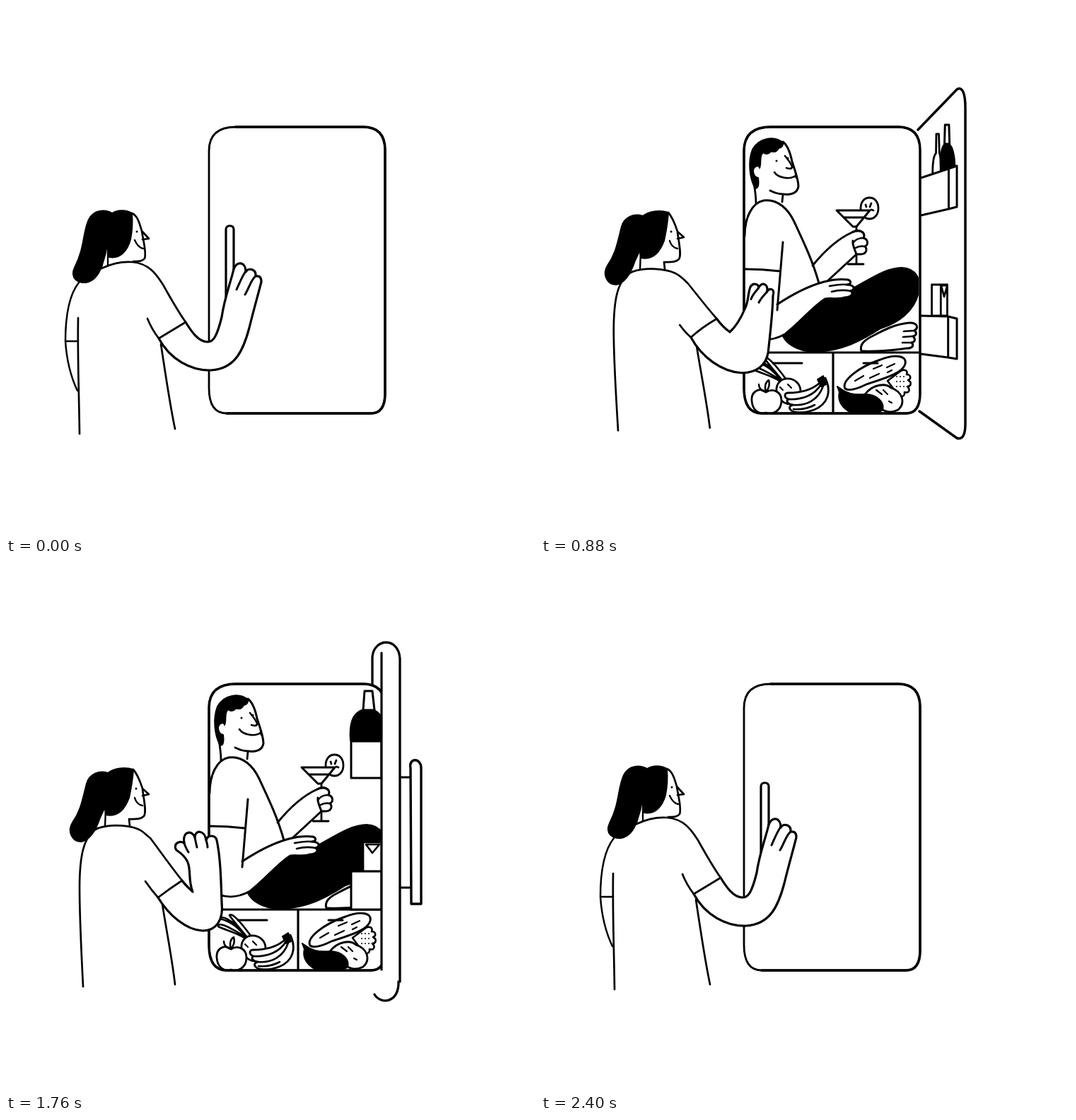
Recreate the animation shown at these times as an HTML page with a canvas. Size 748 by 748 pixels, loop 2.88 s.

```html
<!DOCTYPE html>
<html lang="en">
<head>
<meta charset="utf-8">
<title>Fridge</title>
<style>
html, body { margin: 0; width: 100%; height: 100%; overflow: hidden; background: #fff; }
canvas { display: block; width: 748px; height: 748px; }
</style>
</head>
<body>
<canvas id="stage" width="748" height="748"></canvas>
<script>
const ctx = document.getElementById('stage').getContext('2d');
const LOOP = 2880, STEP = 80, LAST = 30;
const clamp = v => Math.max(0, Math.min(1, v));

function trace(d, matrix) {
  const path = new Path2D();
  path.addPath(new Path2D(d), matrix);
  return path;
}
function ink(d, width = 3, fill = null, matrix = new DOMMatrix()) {
  const path = trace(d, matrix);
  if (fill) { ctx.fillStyle = fill; ctx.fill(path); }
  ctx.lineWidth = width;
  ctx.stroke(path);
}
const solid = (d, matrix) => ink(d, 2, '#000', matrix);
const paper = (d, width, matrix) => ink(d, width, '#fff', matrix);
function dot(x, y, r = 1.5) {
  ctx.fillStyle = '#000';
  ctx.beginPath();
  ctx.arc(x, y, r, 0, 7);
  ctx.fill();
}
// Blend two path strings that share the same commands.
function mix(a, b, t) {
  const number = /[\d.]+/g, goal = b.match(number);
  let i = 0;
  return a.replace(number, v => (+v + (goal[i++] - v) * t).toFixed(2));
}

// ---- Woman ----
const poses = {
  reach: {
    sleeve: 'M135 371 C150 364 165 361 178 362 C204 364 214 382 222 394 C232 412 242 430 254 447 Q236 458 216 470 Q206 457 200 442',
    arm: 'M216 470 C232 500 262 516 290 515 C325 513 336 485 344 455 C350 430 356 410 361 390 C361 380 354 382 353 382 C354 371 342 370 339 376 C339 361 326 360 322 372 C318 390 309 412 305 440 C298 468 293 475 285 475 C272 475 262 460 254 447',
    fingers: 'M353 382 C347 386 344 398 338 408 M339 375 C334 382 330 392 326 401 M322 372 C322 372 322 372 322 372'
  },
  grip: {
    sleeve: 'M135 371 C150 364 165 361 178 362 C195 364 203 372 207 382 C218 404 228 426 241 448 Q223 458 205 468 Q202 462 199 455',
    arm: 'M205 468 C225 500 250 522 280 521 C305 520 316 500 319 470 C322 440 318 412 340 409 C350 408 349 396 344 396 C347 387 341 384 340 385 C342 374 330 370 325 372 C308 373 302 382 298 395 C288 425 283 472 267 472 C256 471 248 460 241 448',
    fingers: 'M344 396 C337 395 330 396 322 398 M340 385 C333 383 325 383 315 388 M325 372 C325 372 325 372 325 372'
  },
  pull: {
    sleeve: 'M130 377 C145 372 165 373 182 374 C200 378 210 392 217 400 C226 408 236 416 247 422 Q215 440 203 464 Q192 455 185 442',
    arm: 'M203 464 C220 495 260 512 300 515 C325 517 350 518 370 517 C386 517 402 514 415 511 C434 508 436 490 422 487 C443 486 446 460 428 457 C453 455 456 432 435 429 C410 425 380 430 350 435 C320 440 290 438 270 434 C261 430 253 426 247 422',
    fingers: 'M422 487 C400 483 380 482 365 483 M428 457 C405 452 385 451 369 452 M435 429 C435 429 435 429 435 429'
  },
  wave: {
    sleeve: 'M130 375 C150 368 180 371 192 379 C196 382 200 386 204 389 C214 402 230 425 249 449 Q232 459 215 470 Q208 464 200 454',
    arm: 'M215 470 C230 498 255 519 278 520 C297 520 308 505 305 480 C304 440 303 405 299 376 C297 364 285 366 285 377 C283 363 267 364 267 380 C262 374 249 376 250 386 C253 400 265 413 268 425 C269 445 269 460 266 470 C260 465 253 456 249 449',
    fingers: 'M285 377 C287 384 288 390 289 398 M267 380 C269 388 270 395 273 402 M250 386 C250 386 250 386 250 386'
  },
  dip: {
    sleeve: 'M130 375 C150 368 180 371 192 379 C196 382 200 386 204 389 C214 402 230 425 249 449 Q232 460 215 473 Q206 463 197 450',
    arm: 'M215 473 C230 498 255 519 278 520 C297 520 308 505 305 480 C304 445 303 415 298 392 C296 384 285 384 283 392 C281 377 267 377 267 388 C263 377 249 379 252 396 C243 391 236 399 241 406 C269 424 254 440 264 465 C260 461 253 455 249 449',
    fingers: 'M283 392 C284 395 285 398 285 402 M267 388 C268 393 269 398 270 402 M252 396 C253 400 255 404 258 409'
  },
  push: {
    sleeve: 'M130 375 C150 368 180 371 192 379 C196 382 200 386 204 389 C214 402 230 425 250 446 Q235 455 216 472 Q206 463 195 448',
    arm: 'M216 472 C232 498 255 522 280 522 C297 522 303 512 306 495 C312 465 325 430 334 397 C334 388 325 389 322 393 C323 380 312 379 310 388 C309 374 298 375 297 390 C291 386 286 395 286 403 C282 430 279 455 276 472 C266 464 258 456 250 446',
    fingers: 'M322 393 C320 399 317 405 315 411 M310 388 C307 394 305 401 303 408 M297 390 C295 395 293 401 292 406'
  }
};
const armKeys = [
  [0, 'reach'], [4, 'grip'], [6, 'grip'], [8, 'pull'], [12, 'wave'], [14, 'wave'], [16, 'dip'],
  [18, 'wave'], [20, 'dip'], [23, 'dip'], [25, 'push'], [27, 'push'], [28, 'reach'], [LAST + 1, 'reach']
];
const pulledBody = 'M109 604 C105 560 99 500 99 450 C100 410 105 385 130 377 M218 482 C223 512 233 560 238 598';
const waitingBody = 'M109 599 C107 560 104 500 104 460 C104 420 108 385 130 375 M221 482 C226 515 235 560 239 596';

function headBack() {
  solid('M150 293 C140 287 124 288 117 302 C108 322 112 340 97 370 C90 385 102 392 113 391 C126 389 132 378 136 366 C141 352 142 345 143 338 L146 355 C162 358 172 345 176 330 C179 315 179 305 178 293 C170 288 158 288 150 293 Z');
  ink('M178 293 C186 296 189 308 192 318 L202 329 L193 330 M192 318 C194 332 199 348 196 357 C192 362 186 361 180 361', 2.7);
  ink('M182 331 C185 338 189 342 194 343 M136 366 L134 371 M144 345 L144 367', 2.3);
  dot(185, 319);
}
function headSide() {
  solid('M144 297 C132 293 118 298 114 312 C108 335 106 350 94 367 C86 380 94 394 106 394 C120 392 128 375 133 360 L140 345 L141 356 C158 360 168 348 174 332 C177 318 179 308 180 292 C168 288 152 290 144 297 Z');
  ink('M180 292 C187 300 190 310 193 319 L202 327 L193 329 M193 320 C195 335 199 352 195 358 C190 363 182 362 174 362 L175 372', 2.7);
  ink('M182 332 C184 339 188 342 193 343 M141 347 L140 373', 2.4);
  dot(184, 319);
}
function woman(step) {
  const next = armKeys.findIndex(k => k[0] > step);
  const [from, a] = armKeys[next - 1], [to, b] = armKeys[next];
  const part = name => mix(poses[a][name], poses[b][name], (step - from) / (to - from));
  const settled = step >= 28;
  ctx.save();
  if (settled) ctx.translate(0, -2);
  if (step < 7 || settled) {
    ink('M103 391 C88 410 84 440 84 474 C86 505 92 525 101 544 M84 474 L102 474', 2.5);
    ink('M102 441 C101 490 103 540 104 605 M219 478 C224 510 231 560 239 598', 2.7);
    headBack();
  } else {
    ink(mix(pulledBody, waitingBody, clamp((step - 8) / 4)), 2.7);
    headSide();
  }
  paper(part('arm'), 3.2);
  ink(part('sleeve'), 2.7);
  ink(part('fingers'), 3);
  ctx.restore();
  if (step === 8) ink('M249 369.5 L254 371');
  if (step === 26) ink('M267 367 L278 375 M258 389 L279 394', 2.7);
}

// ---- Inside the fridge ----
function man() {
  paper('M384 367 C402 345 422 328 440 320 C450 315 460 320 456 328 L446 351 L406 388');
  ink('M300 245 C302 256 304 266 304 279 M342 267 L341 277', 2.8);
  ink('M342 192 C350 198 353 210 355 220 C360 235 364 245 364 255 C362 267 350 267 342 266 C335 266 328 263 324 261');
  solid('M342 193 C330 183 308 186 299 203 C293 218 294 242 303 258 C308 258 308 250 307 243 C299 241 297 228 306 226 C309 226 309 228 309 229 C312 222 308 212 314 207 C319 211 324 208 325 205 C331 208 335 204 336 201 C340 201 343 197 342 193 Z');
  ink('M345 212 C350 218 355 224 355 228 C354 231 350 230 347 229 M330 235 C335 243 352 246 360 240 M360 237 L361 243', 2.6);
  dot(333, 219);
  dot(349, 215);

  solid('M342 467 C360 445 385 415 430 405 C460 390 485 370 510 370 C532 371 538 388 534 405 C528 432 505 448 480 456 C455 472 425 489 385 489 C362 488 348 478 342 467 Z');
  paper('M453 488 C450 478 458 472 470 466 C485 458 500 450 520 448 C531 447 535 454 528 459 C532 462 531 466 526 467 C530 471 529 475 524 476 C528 480 525 484 518 484 C500 486 480 489 455 488');
  ink('M528 459 L513 460 M526 467 L512 468 M524 476 L511 476', 2.6);

  ink('M288 325 C288 300 298 278 315 275 C335 272 350 288 358 305 C372 335 384 360 393 392');
  paper('M334 422 C355 408 378 396 400 390 C412 387 424 386 434 387 C440 389 438 394 432 394 C442 394 446 400 438 403 C442 406 440 411 430 412 C420 416 410 412 402 414 C385 424 368 446 345 464 C325 475 305 474 288 462');
  ink('M342 334 C340 360 337 395 334 430 M288 372 Q313 372 338 375');
  ink('M432 394 C422 393 414 395 408 396 M438 403 C428 401 418 402 411 404', 2.6);
}
function drink() {
  ink('M452 286 C452 266 477 266 477 286 C477 306 452 306 452 286 M459 281 L460 284 M467 279 L465 284 M470 289 L467 288', 2.8);
  paper('M418 289 L465 289 L446 312 L441 312 Z');
  ink('M429 299 L456 299 M446 312 L446 365 M434 365 L456 365', 2.8);
  paper('M440 320 C450 315 460 320 456 328 C463 330 463 338 458 340 C462 344 460 351 452 351 L446 351 C444 345 440 338 441 332');
  ink('M456 328 C450 328 445 330 442 334 M458 340 C452 339 448 340 445 342', 2.6);
}
function groceries() {
  ink('M288 490 L536 490 M413 490 L413 577', 3.2);
  // Turnip, apple, bananas
  ink('M339 531 C325 522 310 519 300 514 C300 508 310 511 339 529 C328 514 316 506 302 503 C302 498 318 501 340 528 C330 515 320 505 316 498 C320 494 332 508 346 527', 2.6);
  paper('M333 545 C331 520 366 522 367 544 C366 568 340 570 333 545 Z', 2.8);
  ink('M338 539 L342 543 M349 535 L354 540', 2.2);
  paper('M318 546 C308 538 297 546 298 558 C299 572 308 578 318 575 C328 579 340 572 340 558 C340 545 328 540 318 546 Z', 2.8);
  ink('M318 546 C316 538 317 532 322 529 C324 535 322 541 318 546 C311 544 308 540 308 535', 2.5);
  paper('M393 530 L402 526 C411 545 406 563 386 571 C370 577 356 575 353 571 C350 568 352 565 356 564 C348 563 346 558 350 556 C343 554 344 547 349 547 C369 547 384 542 394 533 Z', 2.9);
  ink('M350 556 C370 557 387 550 396 535 M356 564 C376 566 393 556 399 537 M357 570 C370 571 380 568 387 564', 2.6);
  solid('M391 528 L399 523 L403 535 L396 538 Z');
  // Lettuce, squash, courgette, aubergine
  paper('M506 518 C512 512 520 515 517 521 C523 521 524 527 519 529 C525 532 523 538 518 538 C523 543 520 548 514 546 C515 552 508 555 504 549 L490 530 Z', 2.6);
  for (let i = 0; i < 9; i++) dot(503 + i % 3 * 5, 524 + Math.floor(i / 3) * 7, 1);
  paper('M458 549 C470 534 488 533 495 540 C511 545 516 561 505 571 C495 576 485 574 480 568 Z', 2.8);
  ink('M474 543 L482 549 M484 543 L490 549 M492 559 L496 561', 2.2);
  paper('M430 541 C424 530 450 510 480 500 C500 492 518 494 515 506 C512 520 480 528 460 535 C448 541 436 545 430 541 Z', 2.9);
  ink('M444 530 L456 523 M465 526 L478 520 M470 513 L482 508 M489 511 L500 506 M490 518 L496 515', 2.2);
  solid('M419 538 L425 542 C434 549 446 550 458 549 C475 549 486 560 483 571 C479 576 466 577 450 577 C431 576 418 561 422 546 Z');
  ink('M328 505 L369 505 M456 505 L476 505');
}

// ---- Cabinet and door ----
const cabinet = 'M287 205 Q287 171 325 171 L505 171 Q536 171 536 204 L536 548 Q536 576 516 576 L312 576 Q287 576 287 540 Z';

function shelfEnds(x, depth) {
  const m = new DOMMatrix().translate(x, 0).scale(depth / 43, 1).translate(-531, 0);
  paper('M505 208 L507 181 L518 181 L521 208 Z', 3, m);
  solid('M487 251 C485 225 492 212 503 208 L521 208 C528 212 530 215 531 220 L531 251 Z', m);
  paper('M488 252 L531 252 L531 304 L488 304 Z', 3, m);
  paper('M505 395 L531 395 L531 436 L505 436 Z M509 398 L528 398 L518 410 Z', 2.7, m);
  paper('M488 436 L531 436 L531 490 L488 490 Z', 3, m);
}
function doorFront(x, top, bottom) {
  const k = Math.min(1, (536 - x) / 121), r = v => x + v * k;
  paper(`M${x} ${top + 36} C${r(-2)} ${top + 9} ${r(10)} ${top - 2} ${r(25)} ${top + 2}
    L516 172 C530 178 536 185 536 205 L536 548 C536 565 530 572 517 577
    L${r(37)} ${bottom - 2} C${r(15)} ${bottom + 4} ${x} ${bottom - 7} ${x} ${bottom - 30} Z`, 3.6);
  const y = top + 150, left = r(29), right = r(45);
  paper(`M${left} ${y + 8} C${left} ${y - 2} ${right} ${y - 2} ${right} ${y + 8}
    L${right} ${y + 183} C${right} ${y + 192} ${r(31)} ${y + 192} ${left} ${y + 186} Z`, 3);
  ink(`M${r(20)} ${y + 12} L${left} ${y + 12}`, 2.8);
}
function doorEdge() {
  ctx.fillStyle = '#fff';
  ctx.fillRect(531, 118, 26, 470);
  ink('M518 172 L518 133 C520 106 555 104 557 135 L557 592 M555 592 C556 622 530 625 521 610', 3.3);
  ink('M531 127 L531 575', 3.2);
  ink('M557 303 L571 303 M557 459 L571 459');
  paper('M572 290 C569 275 587 275 587 290 L587 482 L573 482 Z', 3.4);
}
function doorInside(x, top, bottom) {
  const s = (x - 537) / 158, r = v => x - v * s;
  paper(`M533 175 L${r(30)} ${top + 2} C${r(10)} ${top - 3} ${x} ${top + 8} ${x} ${top + 28}
    L${x} ${bottom - 21} C${x} ${bottom - 3} ${r(13)} ${bottom + 1} ${r(30)} ${bottom - 1} L535 573`, 3.5);
  const m = new DOMMatrix().translate(537, 0).scale(s, 1).translate(-537, 0);
  paper('M579 236 C579 220 582 212 591 208 L592 181 L601 181 L603 208 C607 211 608 216 608 232', 2.8, m);
  paper('M621 195 L623 168 L637 168 L639 195 Z', 3, m);
  solid('M607 232 C605 210 612 198 622 195 L637 195 C650 198 658 212 658 228 Z', m);
  paper('M538 243 L636 230 L665 226 L665 284 L636 287 L538 296 M636 230 L636 287', 3, m);
  paper('M576 394 L631 394 L631 438 L576 438 Z M608 394 L608 438 M609 395 L631 395 L620 411 Z', 2.8, m);
  paper('M538 438 L634 439 L665 442 L665 499 L634 497 L538 492 M634 439 L634 497', 3, m);
}

const doorKeys = [
  [7, 340, 150, 597], [8, 414, 139, 605], [9, 480, 124, 613], [10, 531, 112, 620],
  [11, 600, 116, 612], [12, 646, 117, 611], [13, 680, 125, 602], [14, 695, 132, 593],
  [21, 646, 117, 611], [22, 531, 112, 620], [23, 414, 139, 605], [24, 340, 150, 597], [25, 287, 171, 577]
];
function fridge(step) {
  const [, x, top, bottom] = doorKeys.filter(k => k[0] <= step).pop() || [0, 287, 171, 577];
  paper(cabinet, 2.8);
  if (x === 287) {
    ink('M325 171 L505 171 Q536 171 536 204 L536 548 Q536 576 516 576 L312 576', 3.6);
    paper('M311 316 C311 309 322 309 322 316 L322 472 Q322 476 317 476 Q311 476 311 472 Z', 3.2);
    return;
  }
  ctx.save();
  ctx.clip(new Path2D(cabinet));
  man();
  drink();
  groceries();
  ctx.restore();
  if (x > 531) doorInside(x, top, bottom);
  ink(cabinet, 3.5);
  if (x <= 531) shelfEnds(x, x === 531 ? 43 : 25 + (x - 414) * .14);
  if (x < 531) doorFront(x, top, bottom);
  else if (x === 531) doorEdge();
}

function render(now) {
  const step = Math.min(LAST, Math.floor(now % LOOP / STEP));
  ctx.fillStyle = '#fff';
  ctx.fillRect(0, 0, 748, 748);
  ctx.strokeStyle = '#000';
  ctx.lineCap = ctx.lineJoin = 'round';
  fridge(step);
  woman(step);
}
const start = performance.now();
function tick() {
  render(performance.now() - start);
  requestAnimationFrame(tick);
}
tick();
</script>
</body>
</html>
```
